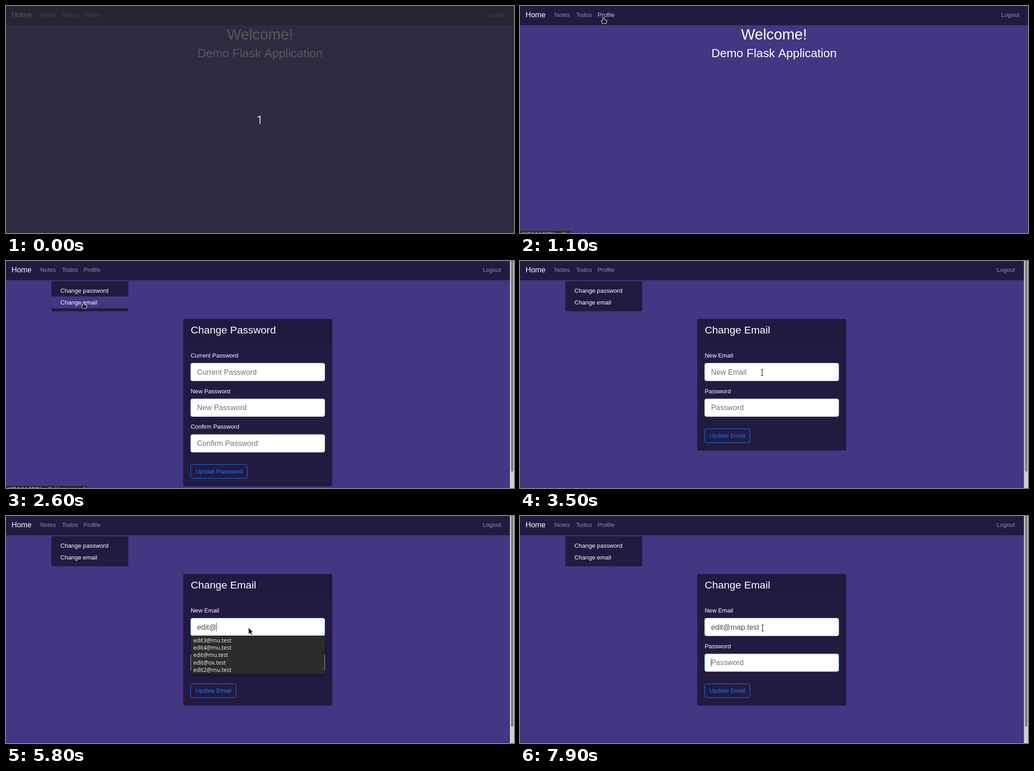
Recreate the animation shown at these times as an HTML page with a canvas. Size 1118 px wide and 501 px high, loop 8000 ms.

```html
<!DOCTYPE html>
<html lang="en">
<head>
<meta charset="utf-8">
<title>Account settings demo</title>
<style>
  html, body { margin: 0; width: 100%; height: 100%; overflow: hidden; background: #443683; }
  canvas { display: block; }
</style>
</head>
<body>
<canvas id="stage" width="1118" height="501"></canvas>
<script>
const ctx = document.getElementById('stage').getContext('2d');
const LOOP = 8000;
const SANS = '"Liberation Sans", Arial, sans-serif';
const UI = '"Open Sans", "Noto Sans", sans-serif';
const SMALL = 13.12, LARGE = 16.4;
const PURPLE = '#443683', DARK = '#231a42';

const EMAIL = 'edit@map.test';
const KEY_TIMES = [4900, 5000, 5300, 5400, 5800, 6300, 6400, 6600, 6700, 7000, 7300, 7400, 7500];
const SUGGESTIONS = ['edit3@mu.test', 'edit4@mu.test', 'edit@mu.test', 'edit@ox.test',
  'edit2@mu.test', 'edge@mu.test', 'edges@mu.test'];

// Step tables: [time, ...values]; each row holds until the next.
const LIST_RANGE = [[0, 0, 0], [4000, 0, 7], [5000, 0, 0], [5100, 0, 7], [5400, 0, 5],
  [5900, 2, 4], [6400, 2, 3], [7400, 0, 0]];
const POINTER = [[0, -50, -50], [500, 112, -4], [600, 128, 2], [700, 148, 5], [800, 168, 17],
  [900, 184, 26], [1700, 186, 36], [1800, 185, 52], [1900, 181, 68], [2000, 176, 82],
  [2100, 171, 90], [2300, 171, 91], [2600, 171, 92], [3400, 380, 185], [3500, 533, 246],
  [4500, 534, 247]];
const STATUS = [[0, ''], [900, '/profile'], [1900, '/profile/change_password'],
  [2000, '/profile/change_email'], [3000, '/change_email'], [3400, '']];

const at = (table, t) => table.findLast(row => row[0] <= t).slice(1);

function text(str, x, middle, size, color = '#fff', align = 'left', family = SANS) {
  ctx.font = `${size}px ${family}`;
  ctx.fillStyle = color;
  ctx.textAlign = align;
  ctx.fillText(str, x, middle + size * 0.3465);
}

function box(x, y, w, h, radius, fill, stroke) {
  ctx.beginPath();
  ctx.roundRect(x, y, w, h, radius);
  if (fill) { ctx.fillStyle = fill; ctx.fill(); }
  if (stroke) { ctx.strokeStyle = stroke; ctx.lineWidth = 1; ctx.stroke(); }
}

function navbar(right, profileHot) {
  const muted = 'rgba(255,255,255,.5)';
  box(0, 0, 1118, 42.5, 0, DARK);
  text('Home', 12.3, 19.6, LARGE);
  text('Notes', 75.5, 19.8, SMALL, muted);
  text('Todos', 123.2, 19.8, SMALL, muted);
  text('Profile', 170.8, 19.8, SMALL, profileHot ? 'rgba(255,255,255,.75)' : muted);
  text('Logout', right, 19.8, SMALL, muted, 'right');
}

function welcome() {
  text('Welcome!', 559, 62.2, 32.8, '#fff', 'center');
  text('Demo Flask Application', 559, 104, 26.24, '#fff', 'center');
}

function countdown() {
  box(0, 0, 1118, 501, 0, 'rgba(39,41,47,.78)');
  text('1', 558.5, 251, 26, '#e4e6f5', 'center', UI);
}

function dropdown(hotItem) {
  box(100, 44.7, 169, 66, 3.3, DARK, 'rgba(0,0,0,.15)');
  if (hotItem >= 0) box(100, 52 + hotItem * 26.2, 169, 26.2, 0, PURPLE);
  text('Change password', 119.8, 65, SMALL);
  text('Change email', 119.8, 91.2, SMALL);
}

function card(title, labels, button, buttonWidth, values, focus) {
  const buttonTop = 212.9 + labels.length * 78.75;
  box(390, 128, 328, buttonTop - 76 , 3.3, null);
  box(390, 128, 328, buttonTop + 48 - 128, 3.3, DARK);
  box(390, 128, 328, 55, [3.3, 3.3, 0, 0], 'rgba(0,0,0,.03)');
  text(title, 406.4, 152.2, 22.96);
  labels.forEach((label, i) => {
    const y = i * 78.75, value = values[i] || '';
    text(label, 406.4, 208.4 + y, SMALL);
    box(406.5, 225.5 + y, 295, 39, 4, '#fff', focus === i ? '#80bdff' : '#ced4da');
    text(value || label, 420.4, 245 + y, LARGE, value ? '#495057' : '#6c757d');
    if (focus === i) {
      const caret = 420 + Math.round(ctx.measureText(value).width);
      box(caret, 235.5 + y, 1, 19, 0, '#495057');
    }
  });
  box(406.5, buttonTop, buttonWidth, 30.4, 3.3, null, '#147af0');
  text(button, 417, buttonTop + 15, SMALL, '#147af0');
}

function suggestions(first, last) {
  if (first === last) return;
  ctx.save();
  ctx.shadowColor = 'rgba(0,0,0,.4)';
  ctx.shadowBlur = 8;
  ctx.shadowOffsetY = 3;
  box(407, 264, 294, 2.5 + (last - first) * 16.4, 0, '#2c2b2a');
  ctx.restore();
  SUGGESTIONS.slice(first, last).forEach((mail, i) =>
    text(mail, 412.3, 274.4 + i * 16.4, 12.3, '#f4f4f4', 'left', UI));
}

function scrollbar() {
  box(1109, 0, 9, 501, 0, '#d0cfce');
  box(1111.5, -4, 5, 469, 2.5, '#7d7c7b');
}

function statusBar(path, t) {
  if (!path) return;
  const url = '127.0.0.1:5000' + path;
  ctx.save();
  ctx.globalAlpha = t < 1100 ? 0.5 : 1;
  ctx.font = `10px ${UI}`;
  const width = Math.round(ctx.measureText(url).width) + 10;
  box(-2, 495.5, width + 2, 20, 3, '#2c2b2a', '#4b4948');
  text(url, 5, 503.5, 10, '#e6e6e6', 'left', UI);
  ctx.restore();
}

function pointer(kind, x, y) {
  const shapes = {
    arrow: 'M0 0V13L3 10.3L5.2 15L7.4 14L5.3 9.4H9.2Z',
    hand: 'M-.8 0H.8V4.5L5.8 5.4L6.4 6.2V9.6L5.4 12H-2L-4.5 8.2V6.6L-2.8 6.2L-1.4 7.5V.6Z',
    beam: 'M-2.5 -6.5H-.6L0 -6L.6 -6.5H2.5M0 -6V6M-2.5 6.5H-.6L0 6L.6 6.5H2.5'
  };
  const path = new Path2D(shapes[kind]);
  ctx.save();
  ctx.translate(x, y);
  ctx.lineJoin = 'round';
  ctx.strokeStyle = '#fff';
  ctx.lineWidth = kind === 'beam' ? 3 : 2;
  ctx.stroke(path);
  if (kind === 'beam') {
    ctx.strokeStyle = '#333';
    ctx.lineWidth = 1.3;
    ctx.stroke(path);
  } else {
    ctx.fillStyle = '#111';
    ctx.fill(path);
  }
  ctx.restore();
}

function draw(t) {
  const [x, y] = at(POINTER, t);
  const [first, last] = at(LIST_RANGE, t);
  const onHome = t < 1400;
  const profileHot = x > 164 && x < 215 && y > 8 && y < 33;
  const inMenu = !onHome && x > 100 && x < 269 && y >= 52 && y < 104.4;
  const hotItem = inMenu ? Math.floor((y - 52) / 26.2) : -1;

  box(0, 0, 1118, 501, 0, PURPLE);
  navbar(onHome ? 1099 : 1089.3, profileHot);
  if (onHome) {
    welcome();
  } else {
    dropdown(hotItem);
    if (t < 2900) {
      card('Change Password', ['Current Password', 'New Password', 'Confirm Password'],
        'Update Password', 124, [], -1);
    } else {
      const typed = EMAIL.slice(0, KEY_TIMES.filter(key => key <= t).length);
      const focus = t < 3900 ? -1 : t < 7800 ? 0 : 1;
      card('Change Email', ['New Email', 'Password'], 'Update Email', 99.5, [typed], focus);
      suggestions(first, last);
    }
    scrollbar();
  }
  statusBar(at(STATUS, t)[0], t);

  const overField = t >= 3500 && first === last;
  pointer(profileHot || inMenu ? 'hand' : overField ? 'beam' : 'arrow', x, y);
  if (t < 100) countdown();
}

function frame() {
  draw(performance.now() % LOOP);
  requestAnimationFrame(frame);
}
frame();
</script>
</body>
</html>
```
